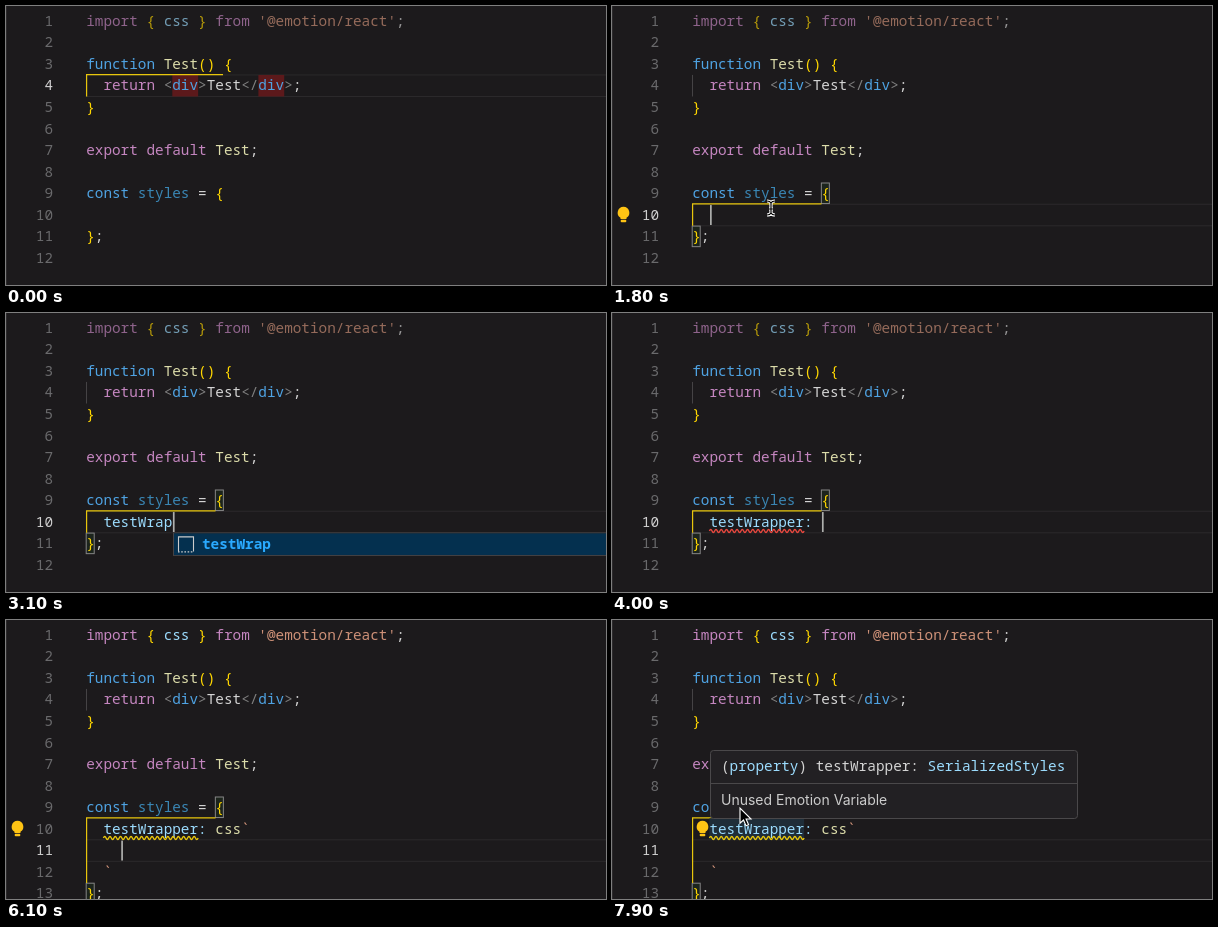
These frames come from a looping animation (600x279 px, 8000 ms). An HTML page:

```html
<!DOCTYPE html>
<html lang="en">
<head>
<meta charset="utf-8">
<title>Editor typing</title>
<style>
  html, body { margin: 0; width: 100%; height: 100%; overflow: hidden; background: #1c1a1c; }
  svg { display: block; width: 600px; height: 279px; }
  text { font: 14.35px "Noto Sans Mono", monospace; white-space: pre; fill: #d4d4d4; }
  .k { fill: #c586c0; } .f { fill: #4fa3e3; } .y { fill: #dcdcaa; } .v { fill: #9cdcfe; }
  .s { fill: #ce9178; } .b { fill: #ffd700; } .g { fill: #808080; } .u { fill: #3a86b4; }
  .w { fill: #d4d4d4; } .m { fill: #2aaaff; font-weight: 700; }
  .dim { opacity: .68; }
  .num { fill: #6a6a6c; text-anchor: end; }
  .on { fill: #d0d0d0; }
  .detail { font-size: 12.1px; }
  .ui { font: 14px Inter, sans-serif; fill: #ccc; }
</style>
</head>
<body>
<svg id="stage" viewBox="0 0 600 279"></svg>
<script>
const LOOP = 8000, CH = 8.61, LH = 21.55, LEFT = 80.2;
const CLICK = 850, TAB = 1400, ENTER = 5700, HOVER = 7300;
const TYPED = 'testWrapper: css`';
const KEYS = [2000, 2150, 2250, 2400, 2800, 2900, 3000, 3100, 3300,
              3400, 3500, 3700, 3800, 4500, 4600, 4700, 5300];
const BLINKS = [-700, CLICK, TAB, ...KEYS, ENTER, 5920];
const PATH_IN = [[100, 470, 292], [300, 440, 258], [850, 215, 212], [1300, 180, 206], [1700, 159, 202]];
const PATH_OUT = [[6300, 608, 262], [6800, 330, 250], [7100, 150, 211], [7700, 128, 192], [7880, 128, 188]];

const stage = document.getElementById('stage');
const col = c => LEFT + c * CH;
const rowTop = line => 4.3 + (line - 1) * LH;
const baseline = line => rowTop(line) + 15.5;
const within = (t, a, b) => t >= a && t < b;
const esc = s => s.replace(/&/g, '&amp;').replace(/</g, '&lt;');

// "~kword" colours a run with class k
const spans = s => s.replace(/~(\w)([^~]*)/g, (_, c, run) => `<tspan class="${c}">${esc(run)}</tspan>`);
const text = (x, y, s, cls = '') => `<text x="${x}" y="${y}" class="${cls}">${spans(s)}</text>`;
const rect = (x, y, w, h, fill, stroke = 'none', extra = '') =>
  `<rect x="${x}" y="${y}" width="${w}" height="${h}" fill="${fill}" stroke="${stroke}" ${extra}/>`;
const path = (d, stroke, width = 1, extra = '', fill = 'none') =>
  `<path d="${d}" stroke="${stroke}" stroke-width="${width}" fill="${fill}" ${extra}/>`;
const at = (x, y, s) => `<g transform="translate(${x} ${y})">${s}</g>`;

const icons = {
  snippet: path('M.5 15V.5H15.5V15', '#ccc', 1.1) + path('M0 15.5H16', '#ccc', 1.2, 'stroke-dasharray="1.6 1.6"'),
  cube: path('M8 .8L14.6 4V11.6L8 15.4L1.4 11.6V4ZM1.4 4L8 7.4L14.6 4M8 7.4V15.4', '#b180d7', 1.2),
  variable: path('M3.5 2H.8V14H3.5M14.5 2H17.2V14H14.5', '#ccc', 1.2) +
            path('M4 7.5L9.5 4.8L13.3 6.6V9L8 11.6L4 9.8ZM4 7.5L8 9.2L13.3 6.6M8 9.2V11.6', '#75beff', 1.2),
  braces: text(-1, 13, '{') + text(9, 13, '}')
};

const bulb = (x, y) => at(x, y,
  path('M0-7.3A6 6 0 0 1 3 3.8V5H-3V3.8A6 6 0 0 1 0-7.3Z', 'none', 0, '', '#ffc414') +
  rect(-2.8, 5.7, 5.6, 2.6, '#ffc414', 'none', 'rx="1"'));

function squiggle(color) {
  let d = `M${col(2)} 218`;
  for (let i = 0; i < 36; i++) d += `q1.3 ${i % 2 ? 3 : -3} 2.63 0`;
  return path(d, color, 1.4);
}

function code(t, typed) {
  const split = t >= ENTER;
  const key = typed.slice(0, 12), value = typed.slice(12, 16), quote = typed.slice(16);
  const rows = [
    "~kimport ~b{ ~vcss ~b} ~kfrom ~s'@emotion/react'~w;",
    '',
    '~ffunction ~yTest~b() {',
    '  ~kreturn ~g<~fdiv~g>~wTest~g</~fdiv~g>~w;',
    '~b}',
    '',
    '~kexport default ~yTest~w;',
    '',
    '~fconst ~ustyles ~w= ~b{',
    `  ~v${key}~y${value}~s${quote}${split ? '' : quote}`,
    ...(split ? ['', '  ~s`'] : []),
    '~b}~w;',
    ...(split ? [] : [''])
  ];
  const active = t < CLICK ? 4 : split ? 11 : 10;
  return rows.map((row, i) =>
    text(47, baseline(i + 1), String(i + 1), i + 1 === active ? 'num on' : 'num') +
    text(LEFT, baseline(i + 1), row, i === 0 && t < 4800 ? 'dim' : '')).join('');
}

function guides(t) {
  const first = t < CLICK;
  const line = first ? 4 : t < ENTER ? 10 : 11;
  const close = first ? 5 : t < ENTER ? 11 : 13;
  const y = rowTop(first ? 4 : 10) - .3;
  let out = rect(0, 0, 1, 279, '#2c2a2c') + rect(LEFT, rowTop(line), 540, LH, 'none', '#2b292b');
  if (first) {
    out += [10, 20].map(c => rect(col(c), rowTop(4), 3 * CH, LH, '#5c191b')).join('');
  } else {
    const box = (c, l) => rect(col(c), rowTop(l) + .3, CH - .6, LH - 1, '#1c241c', '#858585');
    out += path(`M80.5 ${rowTop(4)}V${rowTop(5)}`, '#454345') + box(15, 9) + box(0, close);
  }
  return out + path(`M${first ? 217 : 209.5} ${y}H80.6V${rowTop(close)}`, '#e8c60c', 1.2);
}

function suggest(t, typed, x) {
  let rows, n = typed.length;
  const rest = word => `~m${word.slice(0, n)}~w${word.slice(n)}`;
  if (within(t, 2150, 3700)) {
    rows = [['snippet', '~m' + typed]];
    if (n <= 4) rows.push(['snippet', rest('testa'), 'testAll', 564], ['cube', rest('Test')]);
  } else if (within(t, 4600, 5300)) {
    n -= 13;
    rows = [['variable', rest('css'), '(alias) function css(template', 411],
            ['variable', rest('cssVar')], ['braces', rest('CSS')]];
  } else return '';
  const y = rowTop(11) + .6;
  return rect(x + .5, y - .5, 500, rows.length * LH + 1, '#222023', '#454345') +
    rect(x + 1, y, 500, LH, '#04304f') +
    rows.map(([icon, label, detail, dx], i) => {
      const ry = y + i * LH;
      return at(x + 5, ry + 3, icons[icon]) + text(x + 29, ry + 15.7, label) +
        (detail ? text(dx, ry + 15, detail, i ? 'detail g' : 'detail') : '');
    }).join('');
}

const tooltip = () =>
  rect(98.5, 130.5, 367, 68, '#222023', '#4a484a', 'rx="3"') + path('M99 163.5H465', '#4a484a') +
  text(109, 151.3, '~w(~vproperty~w) testWrapper: ~vSerializedStyles') +
  text(109, 185, 'Unused Emotion Variable', 'ui');

function along(points, t) {
  let i = 0;
  while (i < points.length - 2 && t > points[i + 1][0]) i++;
  const [a, b] = [points[i], points[i + 1]];
  const p = Math.min(1, (t - a[0]) / (b[0] - a[0]));
  return [a[1] + (b[1] - a[1]) * p, a[2] + (b[2] - a[2]) * p];
}

function mouse(t) {
  const late = t >= 6300;
  if (!late && !within(t, 100, 2000)) return '';
  const [x, y] = along(late ? PATH_OUT : PATH_IN, t);
  if (t >= HOVER && y < 199) {
    return at(x, y, path('M0 0V15.2L3.5 12L6 17.8L8.6 16.7L6.1 11H11Z', '#fff', 1.1, '', '#000'));
  }
  const beam = 'M-4-7Q-1-7 0-5Q1-7 4-7M0-5V5M-4 7Q-1 7 0 5Q1 7 4 7M-2 1H2';
  return at(x, y, path(beam, '#fff', 3.2) + path(beam, '#000', 1.2));
}

function scene(t) {
  const typed = TYPED.slice(0, KEYS.filter(k => k <= t).length);
  const split = t >= ENTER;
  const c = split ? 4 : t < TAB ? 0 : 2 + typed.length;
  const last = BLINKS.filter(b => b <= t).pop();
  const caret = t >= CLICK && Math.floor((t - last) / 500) % 2 === 0;
  let out = guides(t);
  if (t >= HOVER) out += rect(col(2), rowTop(10), 11 * CH, LH, '#1f2d38');
  out += code(t, typed);
  if (within(t, 3600, 4700)) out += squiggle('#e8483f');
  if (t >= 6000) out += squiggle('#e8c60c');
  if (caret) out += rect(col(c) + .6, rowTop(split ? 11 : 10) + .8, 1.7, LH - 1.6, '#aeafad');
  if (within(t, 1500, 2700) || within(t, 4300, 5200) || within(t, 6000, 6700)) out += bulb(11.5, 208);
  if (t >= 6700) out += bulb(90.5, 208);
  out += suggest(t, typed, Math.round(col(c) + .5));
  if (t >= HOVER) out += tooltip();
  return out + mouse(t);
}

let shown = '';
const start = performance.now();
function tick() {
  const next = scene((performance.now() - start) % LOOP);
  if (next !== shown) stage.innerHTML = shown = next;
  requestAnimationFrame(tick);
}
tick();
</script>
</body>
</html>
```
